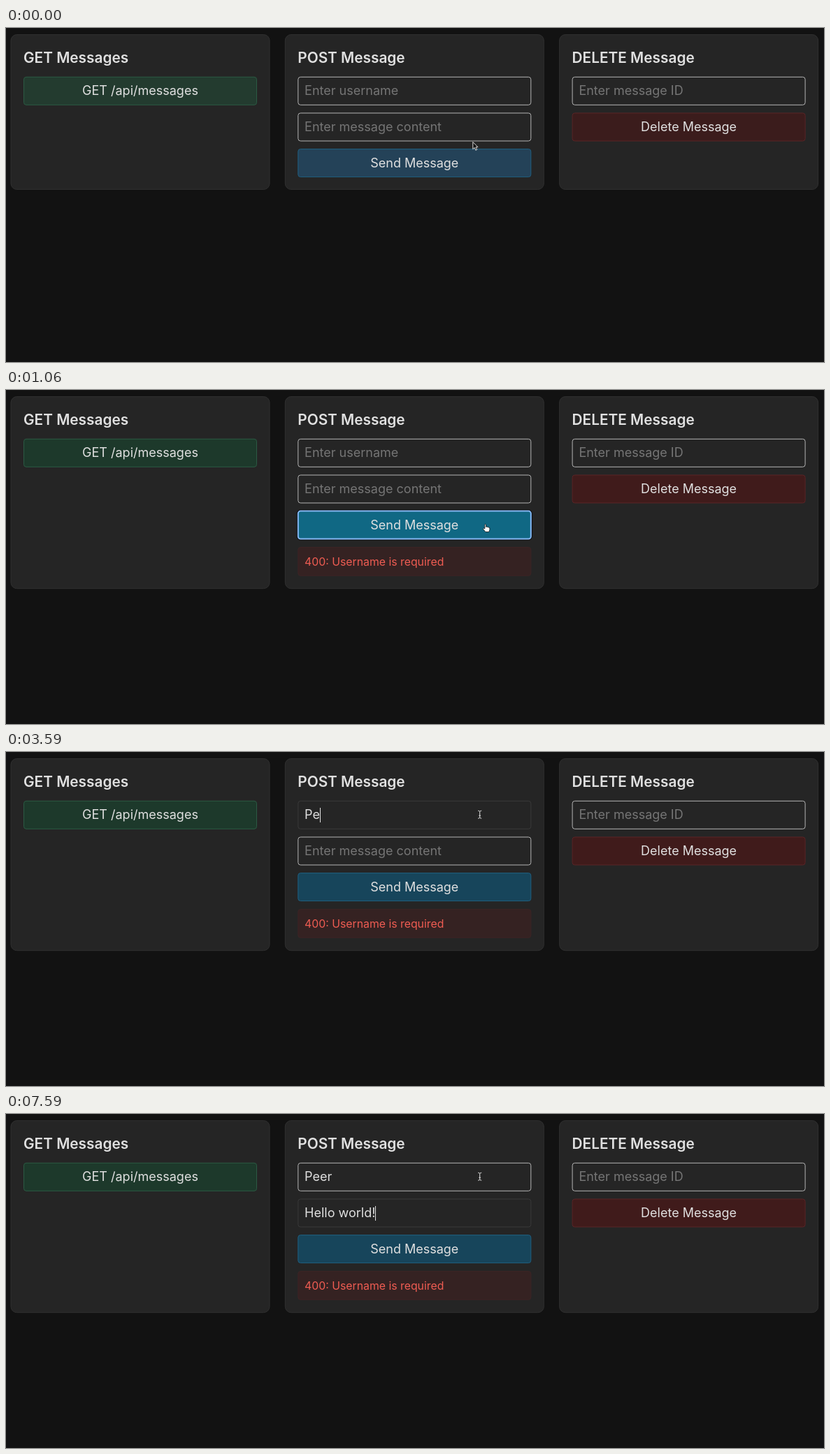
Recreate the animation shown at these times as an HTML page. Size 1170 px wide and 479 px high, loop 8000 ms.

```html
<!DOCTYPE html>
<html lang="en">
<head>
<meta charset="utf-8">
<title>Message API demo</title>
<style>
  html, body { margin: 0; width: 100%; height: 100%; overflow: hidden; background: #121212; }
  svg { display: block; width: 1170px; height: 479px; font: 18px Inter, sans-serif; }
  text { fill: #e0e0e0; white-space: pre; }
  .panel { fill: #252525; stroke: #303030; }
  .title { font-size: 20.8px; font-weight: 600; }
  .mid { text-anchor: middle; }
  .field { fill: #252525; stroke: #b4b4b4; }
  .field.focus { stroke: #3a3a3a; }
  .hint { fill: #757575; }
  .error rect { fill: #352222; stroke: #3d2425; }
  .error text { fill: #ee5c52; font-size: 15.8px; }
</style>
</head>
<body>
<svg id="stage" viewBox="0 0 1170 479"></svg>
<script>
const stage = document.getElementById('stage');

function add(tag, attrs, parent = stage, text = '') {
  const el = document.createElementNS('http://www.w3.org/2000/svg', tag);
  for (const key in attrs) el.setAttribute(key, attrs[key]);
  el.textContent = text;
  return parent.appendChild(el);
}
const set = (el, key, value) => el.setAttribute(key, value);
const show = (el, on) => set(el, 'visibility', on ? 'visible' : 'hidden');
const clamp = v => Math.min(1, Math.max(0, v));
const box = (x, y, attrs, parent) =>
  add('rect', { x, y, width: 333, height: 40, rx: 3.5, ...attrs }, parent);

function button(x, y, fill, stroke, label) {
  const rect = box(x, y, { fill, stroke });
  add('text', { x: x + 166.5, y: y + 26, class: 'mid' }, stage, label);
  return rect;
}
function field(x, y, hint) {
  const rect = box(x, y, { class: 'field' });
  const text = add('text', { x: x + 9.3, y: y + 26 }, stage, hint);
  set(text, 'class', 'hint');
  return { rect, text, hint, x: x + 9.3, y };
}

const columns = [25.5, 417.8, 810.1];
const panels = ['GET Messages', 'POST Message', 'DELETE Message'].map((title, i) => {
  const x = columns[i];
  const panel = add('rect', { x: x - 18.5, y: 9.5, width: 370, height: 222, rx: 8.5, class: 'panel' });
  add('text', { x: x - .5, y: 50, class: 'title' }, stage, title);
  return panel;
});

const getButton = button(columns[0], 70.3, '#233b2f', '#2b5a43', 'GET /api/messages');
const nameField = field(columns[1], 70.3, 'Enter username');
const bodyField = field(columns[1], 122, 'Enter message content');
const ringShade = box(columns[1], 173.6, { fill: 'none', stroke: '#0c0c0c', 'stroke-width': 4 });
const sendButton = button(columns[1], 173.6, '#244258', '#1f5f80', 'Send Message');
const ring = box(columns[1], 173.6, { fill: 'none', stroke: '#85b7f4', 'stroke-width': 2 });
field(columns[2], 70.3, 'Enter message ID');
const deleteButton = button(columns[2], 122, '#3b1c1c', '#5a2426', 'Delete Message');

const error = add('g', { class: 'error' });
box(columns[1], 225.6, { height: 40.7 }, error);
add('text', { x: columns[1] + 9.3, y: 251.6 }, error, '400: Username is required');

const caret = add('rect', { width: 1, height: 21, fill: '#e0e0e0' });
const cursors = {
  arrow: add('path', { d: 'M0 0V10.2L2.4 8L4 11.8L5.8 11L4.2 7.3H7.2Z', fill: '#111', stroke: '#eee', 'stroke-width': .9 }),
  hand: add('path', {
    d: 'M-.9 .8Q0-.6 .9 .8V4.2L2 3.7L3 4.4L4.3 4.3L5 5.1L6.2 5.5V8L5 11.2H.2L-3.2 7.2Q-3.2 5.8-1.8 6L-.9 6.8Z',
    fill: '#fff', stroke: '#111', 'stroke-width': .8 }),
  beam: add('path', { d: 'M-2.5-5.5Q0-5.5 0-4Q0-5.5 2.5-5.5M0-4V4M-2.5 5.5Q0 5.5 0 4Q0 5.5 2.5 5.5M-1.4 1.5H1.4', fill: 'none', stroke: '#ddd', 'stroke-width': 1 })
};

// Key press times, one per character.
const entries = [
  { field: nameField, value: 'Peer', from: 2290, to: 4590, keys: [3350, 3590, 3880, 4000] },
  { field: bodyField, value: 'Hello world!', from: 4590, to: 8000,
    keys: [5060, 5290, 5530, 5650, 5880, 6060, 6350, 6590, 6710, 6880, 7060, 7590] }
];

function type(entry, t) {
  const { field, value, keys } = entry;
  const count = keys.filter(k => k <= t).length;
  const focused = t >= entry.from && t < entry.to;
  field.text.textContent = count ? value.slice(0, count) : field.hint;
  set(field.text, 'class', count ? '' : 'hint');
  set(field.rect, 'class', focused ? 'field focus' : 'field');
  if (!focused) return;
  const last = count ? keys[count - 1] : entry.from;
  set(caret, 'x', Math.round(field.x + (count ? field.text.getComputedTextLength() : 0)));
  set(caret, 'y', Math.round(field.y + 9.5));
  show(caret, Math.floor((t - last) / 500) % 2 === 0);
}

function glide(t, start, steps) {
  const p = clamp((Math.floor((t - start) / 58) + 1) / steps);
  return p * p * (3 - 2 * p);
}
function movePointer(t) {
  const down = glide(t, 60, 5), up = glide(t, 1650, 6);
  const x = 667.8 + 17.9 * down - 8 * up;
  const y = 163.5 + 28.8 * down - 102.6 * up;
  const inside = top => y > top && y < top + 40;
  const kind = inside(173.6) ? 'hand' : inside(70) || inside(122) ? 'beam' : 'arrow';
  for (const name in cursors) show(cursors[name], name === kind && (t >= 60 || name === 'arrow'));
  set(cursors[kind], 'transform', `translate(${x} ${y})`);
}

const mix = (a, b, p) => `rgb(${a.map((v, i) => Math.round(v + (b[i] - v) * p))})`;

function draw(t) {
  const started = t >= 60, failed = t >= 1060, ringed = t >= 880 && t < 2290;
  const hover = clamp((t - 120) / 170) - clamp((t - 1710) / 230);
  set(getButton, 'fill', started ? '#1d392b' : '#233b2f');
  set(deleteButton, 'fill', started ? '#401b1b' : '#3b1c1c');
  set(sendButton, 'fill', started ? mix([23, 69, 91], [16, 104, 132], hover) : '#244258');
  panels.forEach(panel => set(panel, 'height', failed ? 275.2 : 222));
  show(error, failed);
  show(ring, ringed);
  show(ringShade, ringed);
  show(caret, false);
  entries.forEach(entry => type(entry, t));
  movePointer(t);
}

const begin = performance.now();
function frame() {
  draw((performance.now() - begin) % 8000);
  requestAnimationFrame(frame);
}
frame();
</script>
</body>
</html>
```
